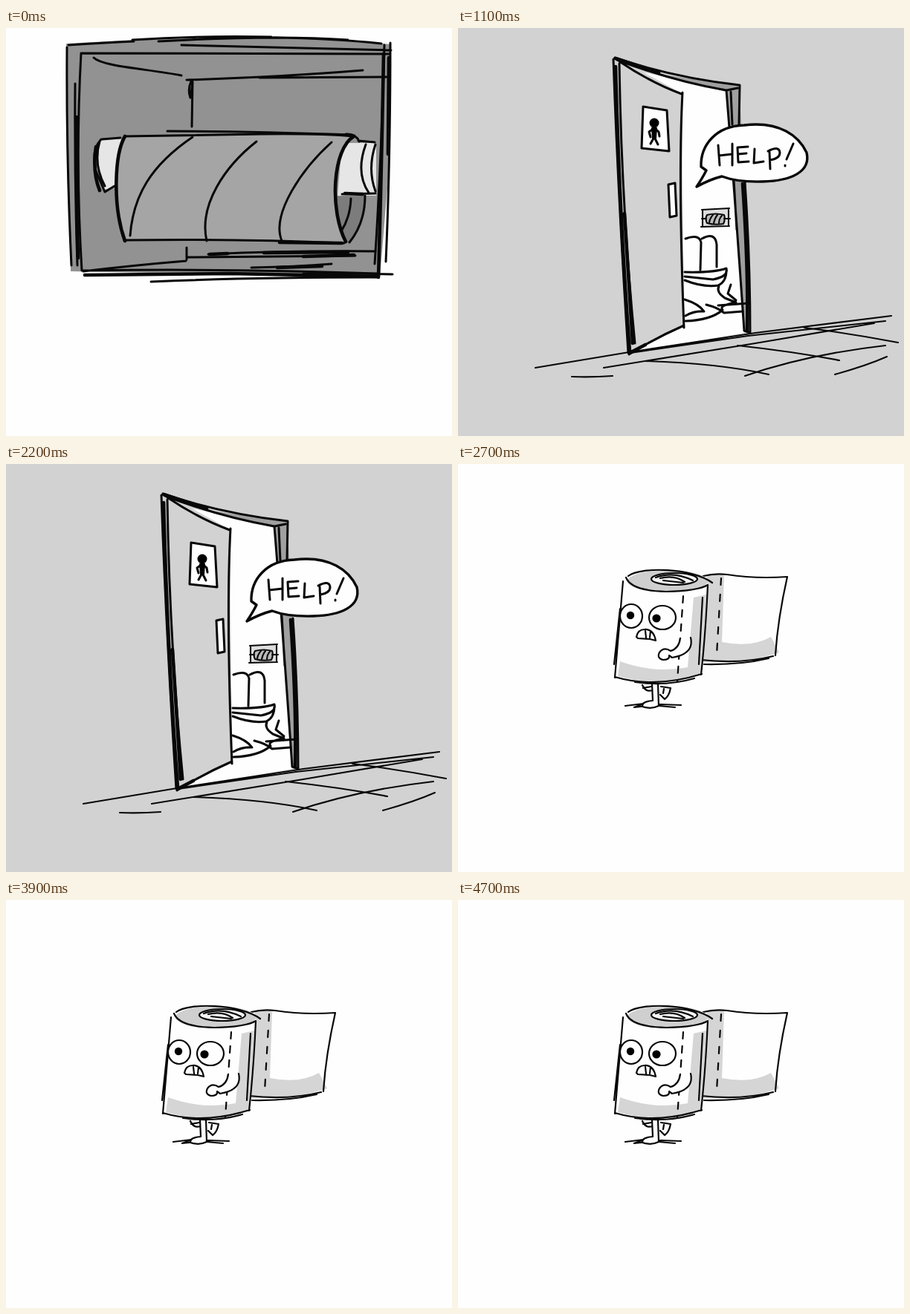
Animation of 600x550 px, one loop 4800 ms. Source, as an HTML page:

```html
<!DOCTYPE html>
<html lang="en">
<head>
<meta charset="utf-8">
<title>Out of paper</title>
<style>
  html, body { margin: 0; width: 100%; height: 100%; overflow: hidden; background: #fefefe; }
  svg { display: block; width: 100%; height: 100%; }
  .ink { fill: none; stroke: #080808; stroke-width: 3; stroke-linecap: round; stroke-linejoin: round; }
  .thin { stroke-width: 2.1; }
  .bold { stroke-width: 4.6; }
  #runner .ink { stroke-width: 2.2; }
  .paper, .ink.paper { fill: #fefefe; }
  .shade { fill: #d5d5d5; }
</style>
</head>
<body>
<svg viewBox="0 0 600 550">
  <g id="holder">
    <!-- recess -->
    <path fill="#929292" d="M81 21L172 16 355 12 450 15 517 22 516 180 503 336 87 328Z"/>
    <path class="ink" d="M170 16Q260 10 357 12M205 18Q360 9 460 16M84 23Q130 20 172 18M360 13Q440 14 505 21
      M236 23Q380 27 518 30M102 34Q300 34 515 35M82 26Q81 175 88 320M101 34Q93 180 102 327
      M93 75Q92 200 96 320M517 20Q517 180 511 315M509 23Q505 180 496 318"/>
    <path class="ink bold" d="M508 35Q505 200 501 336M95 120Q94 220 97 310M515 40L514 170M106 333L300 331 500 335"/>
    <path class="ink" d="M104 327Q300 324 500 331M195 342Q330 336 500 336M400 330L520 332
      M118 40C130 52 190 55 236 64M243 70Q370 66 480 57M341 67L516 66M251 72L250 133M249 72Q244 83 248 94L251 74
      M104 328Q170 320 242 314M243 296V312M245 309L470 307M272 305Q380 300 497 301M330 323Q390 322 438 318"/>
    <path class="ink bold" d="M274 305L298 304M347 303L460 302M365 323L425 321M400 308L468 306"/>
    <!-- spindle and tube -->
    <path fill="#e6e6e6" d="M127 151L155 148 149 213 132 218Q120 185 127 151ZM452 155H498V226L446 226Z"/>
    <path fill="#7c7c7c" d="M442 227L482 226Q483 265 463 289L450 289Z"/>
    <path fill="#a5a5a5" d="M160 145L465 144C439 165 435 240 457 290L159 286C144 240 143 175 160 145Z"/>
    <path class="ink" d="M160 146Q260 144 342 143T468 146M217 139Q320 139 465 144M159 286Q320 284 455 290
      M251 147C195 185 171 226 167 280M337 153C295 186 259 238 270 287M438 154C400 188 356 250 371 287
      M457 143Q471 142 475 153M474 152L496 154M484 157Q470 195 488 222M497 157Q486 190 497 220M452 224L497 223
      M483 226Q483 263 462 289M464 230Q463 255 451 274M129 150L154 148M128 150Q114 165 121 193L133 221 146 213
      M126 153Q117 183 133 213"/>
    <path class="ink bold" d="M160 146C146 170 143 240 160 287M468 146C439 163 435 245 457 288M121 160Q116 195 126 219
      M456 223L480 224M368 289L452 290"/>
    <!-- groping hand -->
    <path id="hand" class="ink paper" d="M-260 720L178 254Q174 221 196 190L226 152Q239 139 247 153L232 189
      278 118Q291 105 301 119L266 194 324 113Q338 104 345 120L294 209 351 148Q364 142 368 157L320 227
      361 195Q376 190 377 204L323 266Q298 303 258 309L-140 840Z"/>
  </g>

  <g id="door">
    <path fill="#d2d2d2" d="M0 0H600V550H0Z"/>
    <path class="paper" d="M250 60L361 84 374 240 385 411 232 438 304 402 301 88Z"/>
    <path fill="#a0a0a0" d="M278 63L378 78 386 210 393 411 385 408 374 240 361 86Z"/>
    <path class="ink" d="M211 40Q290 67 379 77M214 43Q290 72 361 84L376 81M217 45Q260 74 301 89
      M302 87Q296 200 304 404M304 401Q265 418 230 440M209 42Q215 220 229 438M217 48Q220 240 238 425
      M361 84Q372 220 385 408M379 77L378 130M386 208Q393 310 393 411L385 408M367 86L369 130M371 205L375 272"/>
    <path class="ink bold" d="M212 41L270 60M212 52Q217 250 231 436M224 250L235 425M383 210Q391 330 389 408M231 438L252 427"/>
    <path class="ink thin" d="M104 458L230 437 400 411 583 388M232 438L390 415 575 395M196 458L400 425 560 398
      M252 449Q350 452 418 467M376 428Q450 436 513 448M466 404Q530 412 592 424M386 469Q470 440 575 428
      M507 467Q550 455 577 443M153 470Q180 471 208 469"/>
    <!-- sign and handle -->
    <path class="ink paper" d="M249 106L281 111 284 166 247 162ZM283 211L292 209 294 253 285 255Z"/>
    <circle cx="264" cy="128" r="6.5"/>
    <path class="ink" d="M264 135L257 140 259 147M264 135L270 140 271 146M264 147L259 156M264 147L269 157"/>
    <path d="M260 134H268L267 149H261Z"/>
    <!-- small holder and toilet -->
    <path fill="#dedede" d="M328 244H364V268H328Z"/>
    <path class="ink thin" style="fill:#bbb" d="M335 252Q347 249 358 252Q360 258 357 264Q346 266 335 263Q332 257 335 252Z"/>
    <path class="ink thin" d="M328 245L365 243M327 268L365 267M329 245V268M364 244V267M338 262Q339 256 343 252M344 263Q345 257 349 252M351 263Q351 257 355 253M328 257H334M358 257H366"/>
    <path class="ink" d="M306 284Q324 277 327 289L326 326M328 284Q346 274 348 292V322M305 329Q344 330 361 324Q364 335 343 339L305 335
      M305 340Q330 350 350 347Q361 342 361 327M351 348Q347 356 359 364L374 370Q350 374 356 380Q340 394 306 395
      M305 366Q324 372 331 382Q318 381 306 388M334 373Q350 377 358 384L383 382M350 374L391 371M367 346L363 358 374 367"/>
    <g id="bubble" aria-label="HELP!">
      <path class="ink paper" style="stroke-width:3.4" d="M327 187C326 158 347 132 385 131C433 125 459 146 469 168C475 194 448 206 410 207Q376 208 355 200Q339 204 321 214Q329 202 334 192Z"/>
      <path class="ink" d="M350 158L352 185M369 156L369 185M351 172L369 170M390 160L376 161 377 181 391 180M377 170L388 169
        M399 163L398 182 411 180M419 167L420 190M417 166Q432 158 433 168Q433 176 420 178M451 156L442 177M440 185V186"/>
    </g>
  </g>

  <g id="runner">
    <path class="ink" d="M225 326L250 323 237 328 273 324 300 325M270 326L292 328"/>
    <g id="standing" class="ink">
      <path d="M248 298Q252 308 262 305M249 302L260 300M273 300L286 302Q284 313 278 317L272 311M277 303L276 309"/>
      <path class="paper" d="M261 296L262 319Q247 320 248 327Q260 331 270 326L269 296"/>
    </g>
    <g id="leaping" class="ink">
      <path class="paper" d="M247 243L229 281 211 281Q211 290 233 291L257 246M282 246L312 275 319 266Q325 274 315 288L305 283 273 249"/>
    </g>
    <g id="body">
      <g id="tail">
        <path class="paper" d="M325 149L443 152 427 258 328 269Z"/>
        <path class="shade" d="M335 150Q347 146 358 151L355 240Q395 248 421 233L432 254Q390 269 329 267Z"/>
        <path class="ink" d="M330 151Q345 147 362 149Q400 155 443 152Q430 210 427 258M327 264Q380 270 424 259M331 270Q380 271 418 262"/>
        <path class="ink" stroke-dasharray="9 13" d="M354 154L348 257"/>
      </g>
      <path class="paper" d="M223 157L211 288Q265 304 328 284L336 160Z"/>
      <path class="shade" d="M218 266Q265 283 309 274L317 180 334 176 328 282Q270 302 215 286Z"/>
      <ellipse cx="282" cy="158" rx="54" ry="15" fill="#cfcfcf"/>
      <path class="ink" d="M229 151C246 138 315 140 342 160M226 153Q233 171 280 172Q323 171 336 163M222 158Q217 220 211 288
        M218 195L210 270M336 163Q333 230 327 284M329 180L324 270M211 287Q265 303 328 283M238 294Q280 300 318 289"/>
      <ellipse class="ink" cx="291" cy="155" rx="31" ry="8" style="fill:#f4f4f4"/>
      <path class="ink" d="M266 153Q290 144 316 157M272 154Q291 149 305 159M276 157L303 160"/>
      <path class="ink" stroke-dasharray="9 10" d="M303 178L295 293"/>
      <ellipse class="ink paper" cx="233" cy="205" rx="15" ry="16"/>
      <ellipse class="ink paper" cx="275" cy="207" rx="18" ry="16"/>
      <circle cx="232" cy="204" r="5.2"/><circle cx="267" cy="208" r="5.6"/>
      <path class="ink paper" d="M240 233Q242 223 251 223Q263 222 266 238L258 236 242 235ZM252 225L253 234M259 225L258 234"/>
      <path id="restingArm" class="ink paper" d="M299 235Q297 249 286 252Q277 246 271 254Q267 262 276 264Q285 264 284 258L288 261Q318 256 313 234"/>
      <path id="raisedArm" class="ink paper" d="M216 235Q205 238 205 252Q194 249 193 258Q196 267 207 262Q214 259 214 246"/>
    </g>
  </g>
</svg>
<script>
  const parts = Object.fromEntries([...document.querySelectorAll("[id]")].map(el => [el.id, el]));
  const show = (name, on) => { parts[name].style.display = on ? "" : "none"; };
  const move = (name, transform) => parts[name].setAttribute("transform", transform);
  const start = performance.now();

  function draw(now) {
    const step = Math.floor(Math.max(0, now - start) % 4800 / 100);
    const even = step % 2 === 0;
    show("holder", step < 9);
    show("door", step >= 9 && step < 24);
    show("runner", step >= 24);

    // The hand reaches in from the lower left and withdraws.
    const away = 1 - Math.sin(Math.PI * step / 6);
    show("hand", step > 0 && step < 6);
    move("hand", `translate(${-300 * away} ${300 * away})`);

    show("bubble", step >= 11);
    move("bubble", even ? "translate(3 -2)" : "");

    // Running alternates between a standing step and a leap.
    show("standing", !even);
    show("leaping", even);
    show("restingArm", !even);
    show("raisedArm", even);
    move("body", even ? "translate(0 -50)" : "");
    move("tail", even ? "rotate(-9 330 210)" : "");
    requestAnimationFrame(draw);
  }
  draw(start);
</script>
</body>
</html>
```
